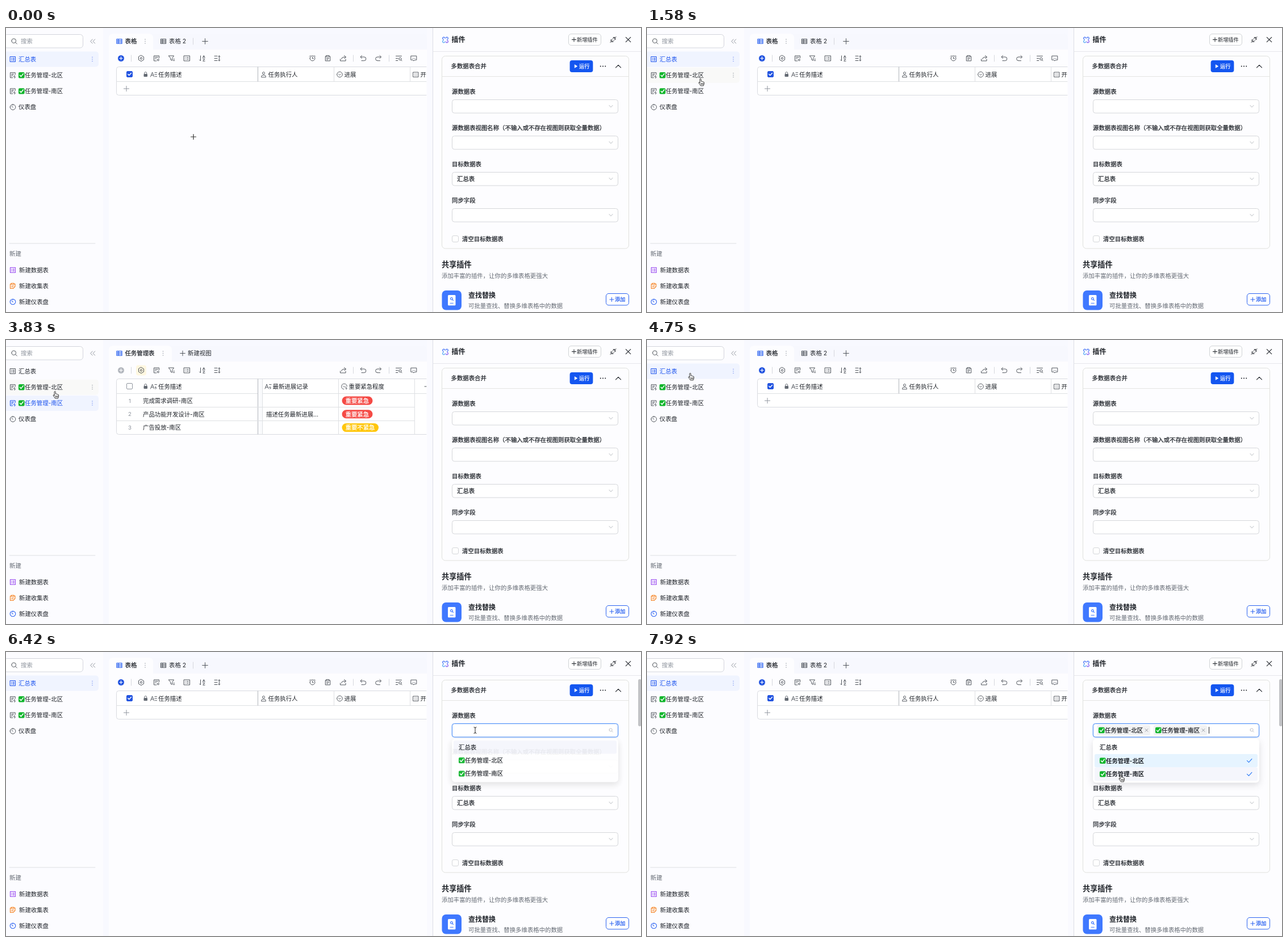
An HTML page for the animation above (8 s loop, 1118 by 501 pixels).

```html
<!DOCTYPE html>
<html lang="zh-CN">
<head>
<meta charset="utf-8">
<title>多数据表合并</title>
<style>
html, body { margin: 0; width: 100%; height: 100%; overflow: hidden; background: #fdfdff; }
svg { display: block; font-family: Inter, "Noto Sans CJK SC", "Noto Sans CJK", "Noto Sans", sans-serif; }
</style>
</head>
<body>
<svg id="stage" width="1118" height="501" viewBox="0 0 1118 501"></svg>
<script>
const INK = '#1f2329', GREY = '#646a73', ICON = '#51565d', PALE = '#8f959e';
const BLUE = '#1c53ee', LINE = '#dee0e3', SOFT = '#d3d5dc';
const LOOP = 8000, STEP = 1000 / 12;

// Drawing helpers: cy is the vertical middle of a text line; weight 500 is thickened with a thin outline
const text = (x, cy, s, fill = INK, size = 10.4, weight = 400, anchor = 'start') =>
  `<text x="${x}" y="${cy + size * .37}" font-size="${size}" font-weight="${weight === 500 ? 400 : weight}" fill="${fill}" text-anchor="${anchor}"${weight === 500 ? ` stroke="${fill}" stroke-width=".25"` : ''}>${s}</text>`;
const rect = (x, y, w, h, r, fill, stroke = 'none', more = '') =>
  `<rect x="${x}" y="${y}" width="${w}" height="${h}" rx="${r}" fill="${fill}" stroke="${stroke}" ${more}/>`;
const path = (x, y, d, stroke = ICON, width = 1, fill = 'none') =>
  `<path transform="translate(${x} ${y})" d="${d}" fill="${fill}" stroke="${stroke}" stroke-width="${width}" stroke-linecap="round" stroke-linejoin="round"/>`;
const hline = (x1, x2, y, c = LINE) => path(x1, y, `M0 0H${x2 - x1}`, c);
const vline = (x, y1, y2, c = LINE) => path(x, y1, `M0 0V${y2 - y1}`, c);

const circle = r => `M${-r} 0a${r} ${r} 0 1 1 ${2 * r} 0a${r} ${r} 0 1 1 ${-2 * r} 0`;
const plus = r => `M${-r} 0H${r}M0 ${-r}V${r}`;
const cross = r => `M${-r} ${-r}L${r} ${r}M${r} ${-r}L${-r} ${r}`;
const D = {
  list: 'M-4.5-4.5h9v9h-9zM-2.6-2h.6M0-2h2.6M-2.6 0h.6M0 0h2.6M-2.6 2h.6M0 2h2.6',
  bolt: 'M4.2-1v-3.5h-8.7v9h4.2M-2.4-2h4M-2.4 0h2.6M-2.4 2h1.2M3.4 .2l-2 2.6h3l-1.4 2.6',
  gauge: circle(4.8) + 'M.2.4L-2-2M0-4.6v1.2',
  collect: 'M3-3.5h1v4.5l-3.5 3.5h-5v-8h1.2M-2.5-4.8h4.5v2h-4.5zM-2.2 0h4M-2.2 2h2',
  grid: 'M-4.5-4h9v8h-9zM-4.5-1.4h9M-4.5 1.4h9M-1.4-4v8',
  search: 'M-4.5-.8a3.8 3.8 0 1 1 7.6 0a3.8 3.8 0 1 1-7.6 0M2.2 2L4.8 4.6',
  seek: 'M-3-.6a2.6 2.6 0 1 1 5.2 0a2.6 2.6 0 1 1-5.2 0M1.6 1.4L3.4 3.2',
  gear: 'M0-5.2L4.5-2.6V2.6L0 5.2L-4.5 2.6V-2.6zM-1.7 0a1.7 1.7 0 1 1 3.4 0a1.7 1.7 0 1 1-3.4 0',
  form: 'M4.5-.5v-4h-9v9h4.5M-2.4-2h4.8M-2.4 .5h2.2M1.4 2.8a1.5 1.5 0 1 1 3 0a1.5 1.5 0 1 1-3 0',
  filter: 'M-5-4.5H4L1 0V3.8L-1.8 2.4V0zM3 1.5h2.2M3 4h2.2',
  rows: 'M-5-4.5H5V4.5H-5zM-2.8-1.6h.5M-.2-1.6h3M-2.8 1.4h.5M-.2 1.4h3',
  sort: 'M-3-4.5V4.5L-4.8 2.6M1-1L2.8-5L4.6-1M1.6-2.2h2.4M1.2 1h3.2L1.2 4.8h3.4',
  height: 'M-5-4h5M-5 0h5M-5 4h5M3.4-4.5v9M1.9-3L3.4-4.6L4.9-3M1.9 3L3.4 4.6L4.9 3',
  clock: circle(4.4) + 'M0-2.2V.4H2M-5-3.4L-3.4-5M5-3.4L3.4-5',
  copy: 'M3-3.5h1.2v8h-8.4v-8h1.2M-2.4-5h4.8v2.4h-4.8zM-2 0h4M-2 2.3h2.6',
  share: 'M-5 1.5v3H4.5V1.5M2-5L5-2.2L2 .6M4.8-2.2H1.5Q-2.6-2.2-3 1.4',
  undo: 'M-2.4-5L-5-2.4L-2.4.2M-4.8-2.4H1.5a3.3 3.3 0 0 1 0 6.6H-3',
  redo: 'M2.4-5L5-2.4L2.4.2M4.8-2.4H-1.5a3.3 3.3 0 0 0 0 6.6H3',
  find: 'M-5-4H5M-5 0h3.4M-5 4h3.4M.2 1a2.2 2.2 0 1 1 4.4 0a2.2 2.2 0 1 1-4.4 0M4 2.8L5.4 4.4',
  comment: 'M-4.8-4.2H4.8V2.8H1.4L0 4.6L-1.4 2.8H-4.8zM-2 0h.2M0 0h.2M2 0h.2',
  person: 'M-2-2.4a2 2 0 1 1 4 0a2 2 0 1 1-4 0M-4 4.4Q-4 1.2-1.5 1.2H1.5Q4 1.2 4 4.4z',
  state: circle(4.8) + 'M-2-.8L0 1.2L2-.8',
  stateBolt: 'M4.8-.4A4.8 4.8 0 1 0-.6 4.8M-2-.8L0 1.2L2-.8M3.6 1l-1.4 2h2.6l-1.4 2.2',
  date: 'M-4.5-4h9v8.4h-9zM-2.2-1h.3M0-1h.3M2.2-1h.3M-2.2 1.8h.3M0 1.8h.3M2.2 1.8h.3',
  letter: 'M-5.5 4L-2.4-4L.7 4M-4.4 1.2H-.5M2-3.4H5.5M1.6 0H5.5M2.6 3.6H5.5',
  spark: 'M-5.5 4L-2.4-4L.7 4M-4.4 1.2H-.5M2-3.4H5.5M3.6 0l-1.4 2h2.6l-1.4 2.4',
  down: 'M-3-1.6L0 1.8L3-1.6',
  up: 'M-4.5 2.4L0-2.2L4.5 2.4',
  fold: 'M-.8-3.6L-4.2 0L-.8 3.6M3.6-3.6L.2 0L3.6 3.6',
  plug: 'M-5 5L-3 3M5-5L3-3M-3.6.2L-.2 3.6M-3.6.2Q-5 2.4-3.4 3.4T-.2 3.6M.2-3.6L3.6-.2M.2-3.6Q2.4-5 3.4-3.4T3.6-.2M-1.8-.6l1-1M.8 1.8l1-1',
  tick: 'M-4 0L-1 3L4.4-3'
};

const dots = (x, y, c = GREY, wide = false) => [-1, 0, 1].map(i => wide
  ? `<circle cx="${x + i * 4.2}" cy="${y}" r="1" fill="${c}"/>`
  : `<circle cx="${x}" cy="${y + i * 3.4}" r=".75" fill="${c}"/>`).join('');
const done = (x, y) => rect(x, y - 5.2, 10.6, 10.4, 2, '#10b52c') +
  path(x + 5.3, y, 'M-2.8.2L-.8 2.4L3-2.6', '#fff', 1.5);
const task = (x, y, zone, c = INK, weight = 400) =>
  done(x, y) + text(x + 11, y, `任务管理-${zone}区`, c, 10.4, weight);

function sidebar(selected, hover) {
  let s = rect(0, 0, 171, 501, 0, '#fcfcff') + rect(-3.5, 11.5, 139, 23.5, 5, '#fff', SOFT) +
    path(14.5, 23.5, D.search) + text(26, 23.5, '搜索', PALE) + path(153, 23.5, D.fold, PALE);
  ['汇总表', '北', '南', '仪表盘'].forEach((name, i) => {
    const y = 55 + i * 28.2, on = i === selected, c = on ? BLUE : INK;
    if (on) s += rect(-5, y - 13.5, 168, 27, 5, '#f0f4ff');
    else if (i === hover) s += rect(-5, y - 13.5, 168, 27, 5, '#f9f9f8');
    s += path(12, y, [D.list, D.bolt, D.bolt, D.gauge][i], on ? BLUE : ICON);
    s += i % 3 ? task(22, y, name, c) : text(22, y, name, c);
    if (on || i === hover) s += dots(152, y, on ? '#6f8ff0' : PALE);
  });
  s += hline(6, 157, 380, LINE) + text(6, 398, '新建', GREY);
  [['新建数据表', D.list, '#9a4df0'], ['新建收集表', D.collect, '#f5801f'], ['新建仪表盘', D.gauge, '#2b62f0']]
    .forEach(([name, d, c], i) => s += path(12, 427 + i * 28, d, c, 1.1) + text(23, 427 + i * 28, name));
  return s;
}

function header(x, d, label) {
  return path(x, 82, d, ICON, .95) + text(x + 8, 82, label);
}

function table(selected) {
  const total = selected === 0, bottom = total ? 118.5 : 166.5, tabEnd = total ? 259 : 292;
  let s = rect(171, 0, 581, 501, 0, '#f8f9ff') + rect(181, 10, 560, 500, 7, '#f7f8fe') +
    rect(181, 38, 560, 470, 0, '#fdfdff') + rect(181, 10, tabEnd - 181, 34, 7, '#fdfdff') +
    path(199.5, 23.5, D.grid, '#2b62f0', 1.2);
  if (total) {
    s += text(209.5, 23.5, '表格', INK, 10.4, 500) + dots(245, 23.5, PALE) + path(277, 23.5, D.grid, ICON, 1.1) +
      text(287, 23.5, '表格 2') + vline(329.5, 18, 29, '#d5d7dd') + path(350.5, 23.5, plus(4.8), ICON);
  } else {
    s += text(209.5, 23.5, '任务管理表', INK, 10.4, 500) + dots(276.5, 23.5, PALE) +
      path(311, 23.5, plus(4.3), ICON) + text(320, 23.5, '新建视图');
  }

  s += path(202.5, 53.5, circle(5.5), 'none', 0, total ? '#2455e0' : '#b4b8bf') + path(202.5, 53.5, plus(2.6), '#fff', 1.2);
  if (!total) s += rect(229, 44.5, 18, 18, 4, '#fff7e0');
  const tools = [[238, 'gear'], [265, 'form'], [291.5, 'filter'], [318.5, 'rows'], [345.5, 'sort'], [372, 'height'],
    [593.5, 'share'], [629, 'undo'], [655.5, 'redo'], [691.5, 'find'], [718, 'comment']];
  if (total) tools.push([539.5, 'clock'], [566.5, 'copy']);
  s += tools.map(([x, n]) => path(x, 53.5, D[n])).join('');
  s += [220.5, 611.5, 674.5].map(x => vline(x, 48, 59, '#d5d7dd')).join('');

  s += path(0, 0, `M740 68.5H198.5Q194.5 68.5 194.5 72.5V${bottom - 4}Q194.5 ${bottom} 198.5 ${bottom}H740`, '#d9dbe0', 1, '#fff');
  s += hline(195, 740, 94.5);
  s += rect(212.5, 76.5, 10, 10, 1.5, total ? '#2455e0' : '#fff', total ? '#2455e0' : PALE);
  if (total) s += path(217.5, 81.5, 'M-2.8 0L-.8 2L3-2', '#fff', 1.4);
  s += rect(242.5, 81, 6.5, 5, 1, GREY) + path(245.7, 81, 'M-2 0V-1.4a2 2 0 0 1 4 0V0', GREY);
  s += header(260, total ? D.letter : D.spark, '任务描述');
  if (total) {
    s += header(453.5, D.person, '任务执行人') + header(587.5, D.state, '进展') + header(721.5, D.date, '开') +
      vline(443.5, 69, 94, '#b0b4bb') + vline(577.5, 69, 94) + vline(711.5, 69, 94) + path(212, 107, plus(4.6), PALE);
  } else {
    s += header(461.5, D.spark, '最新进展记录') + header(595.5, D.stateBolt, '重要紧急程度') + hline(737, 740, 82, ICON);
    s += rect(444, 69, 7, 97, 0, '#f9fafc') + vline(443.5, 69, 166, '#b4b8be') + vline(451.5, 69, 166) +
      vline(585.5, 69, 166) + vline(719.5, 69, 166);
    const zone = selected === 1 ? '北' : '南';
    ['完成需求调研', '产品功能开发设计', '广告投放'].forEach((name, i) => {
      const y = 107 + i * 23.8, last = i === 2;
      if (!last) s += hline(195, 719, 118.5 + i * 24);
      s += text(218, y, i + 1, PALE, 9.6, 400, 'middle') + text(241, y, `${name}-${zone}区`);
      s += rect(591.5, y - 7.5, last ? 64.5 : 54, 15, 7.5, last ? '#ffc60a' : '#f54a45') +
        text(597.5, y, last ? '重要不紧急' : '重要紧急', '#fff', 10.4, 500);
    });
    s += text(458, 131, '描述任务最新进展...');
  }
  return s + rect(741, 0, 11, 501, 0, '#fafaff');
}

function panel(light) {
  let s = rect(752, 0, 366, 501, 0, '#fdfdff') + vline(751.5, 0, 501, '#dcdee4') + hline(752, 1118, 41.5, '#e6e7eb');
  ['#3c6cf5', '#7b52f0', '#4aa3f5', '#3c6cf5'].forEach((c, i) =>
    s += `<g transform="translate(773.5 21) rotate(${i * 90})">${path(0, 0, 'M.9-3.2A2 2 0 1 1 3.2-.9', c, 1.2)}</g>`);
  s += text(784.5, 21, '插件', INK, 12, 600) + rect(990.5, 10.5, 57, 20, 4.5, '#fff', '#d0d3d6') +
    path(1000, 20.5, plus(3.6), INK) + text(1005, 20.5, '新增插件', INK, 9.2) +
    path(1069, 20.5, D.plug, INK) + path(1095.5, 20.5, cross(4.2), INK, 1.1);

  s += rect(767.5, 49.5, 329, 339.5, 6, '#fdfdff', '#e0e1dd') + hline(768, 1096, 85.5, '#e4e5e2') +
    text(783.5, 67.5, '多数据表合并', INK, 10.4, 500) +
    rect(992.6, 57, 40.8, 21, 4, light ? '#336df4' : '#1456f0') + path(1003.5, 67.5, 'M-2-2.6L2.2 0L-2 2.6z', '#fff', .8, '#fff') +
    text(1009, 67.5, '运行', '#fff', 9.2, 500) + dots(1051, 67.5, INK, true) + path(1078, 67.5, D.up, INK, 1.1);
  ['源数据表', '源数据表视图名称（不输入或不存在视图则获取全量数据）', '目标数据表', '同步字段'].forEach((label, i) => {
    const y = 112 + i * 64;
    s += text(785, y, label, INK, 10.4, 500) + rect(785.5, y + 14.5, 292, 23.5, 4, '#fff', '#d5d7da') +
      path(1065, y + 26, D.down, '#b9bcc2');
  });
  s += text(794, 266, '汇总表', INK, 10.4, 500) + rect(785.5, 366.5, 11, 11, 2.5, '#fff', '#d5d7da') +
    text(803, 372, '清空目标数据表', INK, 10.4, 500);

  s += text(767, 417.5, '共享插件', INK, 13.2, 600) + text(767, 437, '添加丰富的插件，让你的多维表格更强大', GREY) +
    rect(767.5, 463, 34.5, 34.5, 7, '#3f78ff') + rect(778, 471, 13.5, 18.5, 1.5, '#fff') +
    path(784.7, 478, 'M-2.2-.5a1.9 1.9 0 1 1 3.8 0a1.9 1.9 0 1 1-3.8 0M1.2 1L2.8 2.6M-2.6 7.5H2.6', '#3f78ff', 1.2) +
    text(814, 472, '查找替换', INK, 12, 600) + text(814, 490, '可批量查找、替换多维表格中的数据', GREY) +
    rect(1056.5, 468.5, 40, 20.5, 4.5, '#fff', '#2b62f0') + path(1066.5, 479, plus(3.6), '#2b62f0') +
    text(1072, 479, '添加', '#2b62f0', 9.2, 500);
  return s;
}

function picker(k, [x, y], over) {
  const p = Math.min(1, Math.max(0, (k - 74) / 4)), open = 1 - (1 - p) ** 2;
  const chosen = k < 87 ? 0 : k < 95 ? 1 : 2;
  let s = '';
  if (over || open) s += rect(785.5, 126.5, 292, 23.5, 4, '#fff', '#4c8ef7',
    open ? 'style="filter:drop-shadow(0 0 1px #a9cdff)"' : '') + path(1065, 138, open ? D.seek : D.down, '#b9bcc2', .9);
  if (!open) return s;
  ['北', '南'].slice(0, chosen).forEach((zone, i) => s += rect(792 + i * 100, 129, 94, 18, 3, '#f1f2f3') +
    task(795 + i * 100, 138, zone, INK, 500) + path(879.5 + i * 100, 138, cross(2.4), PALE, .9));
  if (chosen) s += vline(789.5 + chosen * 100, 132.5, 143.5, INK);

  const hover = y < 156 ? 0 : Math.min(2, Math.floor((y - 156) / 23.7));
  let menu = rect(785, 153, 293, 77.5, 6, '#fff', 'none', 'style="filter:drop-shadow(0 4px 6px #1f232926)"');
  ['汇总表', '北', '南'].forEach((name, i) => {
    const cy = 168 + i * 23.7, on = i > 0 && i <= chosen, weight = on ? 600 : 500;
    if (on || i === hover) menu += rect(788, cy - 11.8, 287, 23.6, 3, on && i !== hover ? '#e6f4ff' : '#f5f6fc');
    menu += i ? task(797, cy, name, INK, weight) : text(797, cy, name, INK, 10.4, weight);
    if (on) menu += path(1060.5, cy, D.tick, '#2f7cf6', 1.2);
  });
  const scale = .8 + .2 * open;
  return s + `<g opacity="${open}" transform="translate(0 ${153 * (1 - scale)}) scale(1 ${scale})">${menu}</g>`;
}

// Pointer path: first step, last step, end x, end y
const MOVES = [[1, 2, 288, 185], [4, 6, 291, 193], [11, 13, 129, 119], [14, 17, 94, 89], [26, 28, 94, 115],
  [46, 49, 76, 58], [63, 65, 736, 182], [68, 71, 814, 153], [72, 74, 826, 138], [78, 84, 832, 195], [88, 93, 834, 216]];

function pointerAt(k) {
  let x = 330, y = 192;
  for (const [a, b, tx, ty] of MOVES) {
    if (k < a) break;
    const p = Math.min(1, (k - a + 1) / (b - a + 1)), e = 1 - (1 - p) ** 2;
    x += (tx - x) * e;
    y += (ty - y) * e;
  }
  return [x, y];
}

function pointer(x, y, over, menu) {
  if (x < 163 || menu) return path(x, y + .5,
    'M-1 1Q-1 0 0 0T1.2 1V4.6Q2.2 3.8 3 5Q4 4.4 4.8 5.6Q6.6 5 6.6 7.4Q6.6 10 5.4 12.4H.4Q-.6 10.4-2.6 8Q-3.4 6.6-2.4 6.2T-1 7.4zM1.2 8v2.4M3 8v2.4M4.8 8v2.4', '#222', .9, '#fff');
  if (over) return path(x, y, 'M-2-5.5Q0-5.5 0-4V4Q0 5.5-2 5.5M2-5.5Q0-5.5 0-4M0 4Q0 5.5 2 5.5', '#222');
  if (x > 181 && x < 741 && y > 119) return path(x, y, plus(4.5), '#fff', 2.6) + path(x, y, plus(4.5), '#333', 1.2);
  return path(x, y, 'M0 0V9.6L2.1 7.7L3.7 11.2L5.2 10.5L3.7 7.2H6.6z', '#fff', .8, '#111');
}

function draw(k) {
  const selected = k < 23 || k >= 57 ? 0 : k < 38 ? 1 : 2;
  const [x, y] = pointerAt(k);
  const hover = x < 163 ? Math.floor((y - 41) / 28) : -1;
  const over = x > 785 && x < 1078 && y > 126 && y < 150;
  const menu = k > 75 && y > 155;
  return table(selected) + sidebar(selected, hover) + panel(k >= 5 && k < 19) +
    picker(k, [x, y], over) + (k >= 68 ? rect(1113, 48, 5.5, 83, 2.7, '#c2c3c6') : '') + pointer(x, y, over, menu);
}

const stage = document.getElementById('stage');
let shown = -1;
function tick(now) {
  const k = Math.floor((now % LOOP + 4) / STEP) % 96;
  if (k !== shown) stage.innerHTML = draw(shown = k);
  requestAnimationFrame(tick);
}
tick(performance.now());
</script>
</body>
</html>
```
